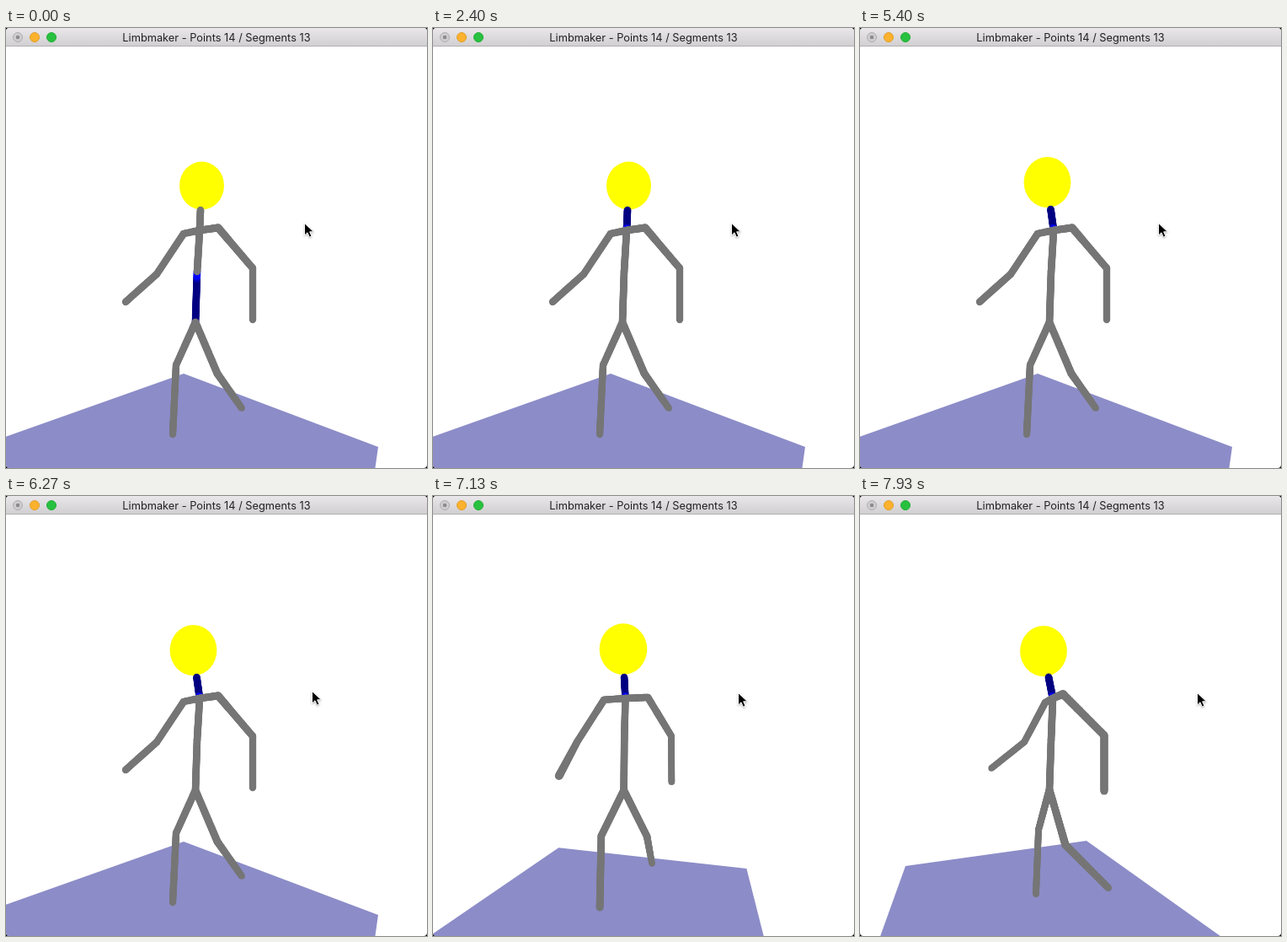
An HTML page with a canvas for the animation above (8 s loop, 500 by 522 pixels).

```html
<!DOCTYPE html>
<html lang="en">
<head>
<meta charset="utf-8">
<title>Stick figure editor</title>
<style>
  html, body { margin: 0; width: 100%; height: 100%; overflow: hidden; background: #000; }
  .window { position: relative; width: 500px; height: 522px; overflow: hidden; background: #fff; border-radius: 4px; }
  canvas { position: absolute; left: 0; top: 0; }
  .bar {
    position: absolute; left: 0; top: 0; width: 500px; height: 22px; box-sizing: border-box;
    background: linear-gradient(#e9e7e9, #d1cfd1); border-bottom: 1px solid #b3b1b3;
    font: 12.8px/23px Inter, Roboto, sans-serif; color: #222; text-align: center; white-space: nowrap;
  }
  .bar i { position: absolute; top: 5px; width: 12px; height: 12px; border-radius: 50%; box-sizing: border-box; }
  .close { left: 8px; background: radial-gradient(circle, #8d8b8d 0 2px, #cfcdcf 2.6px); border: 1px solid #aeacae; }
  .min { left: 28px; background: #fdb22e; border: 1px solid #e09e2a; }
  .max { left: 48px; background: #28c13f; border: 1px solid #22ab35; }
  .arrow { position: absolute; left: 0; top: 0; width: 16px; height: 22px; overflow: visible; filter: drop-shadow(0 1px 1px rgba(0,0,0,.3)); }
</style>
</head>
<body>
<div class="window">
  <canvas id="stage" width="500" height="522"></canvas>
  <div class="bar"><i class="close"></i><i class="min"></i><i class="max"></i>Limbmaker - Points 14 / Segments 13</div>
  <svg class="arrow" id="arrow"><path d="M.5 .5V15L4 11.8 6.4 17.2 9 16 6.7 10.8H11.4Z" fill="#000" stroke="#fff"/></svg>
</div>
<script>
const LOOP = 8000, RATE = 15;
const ctx = document.getElementById('stage').getContext('2d');
const arrow = document.getElementById('arrow');

// Screen positions seen from three orbit angles: front, rest, side.
const ANGLES = [0, 40, 67];
const JOINTS = {
  hip: [227, 349, 225, 349, 225, 348],
  belly: [227, 289, 227, 289, 227, 289],
  chest: [227, 240, 230, 240, 229, 240],
  neck: [227, 215, 226.5, 215, 224, 215],
  lShoulder: [200, 240, 211, 244, 220, 245],
  rShoulder: [254, 240, 252, 237, 241, 235],
  lElbow: [170, 291, 179, 292, 195, 292],
  rElbow: [273.5, 285, 293, 285, 290, 284],
  lHand: [160, 337, 142, 325, 156, 323],
  rHand: [273.5, 336, 293, 346, 290, 350],
  lKnee: [200, 405, 202, 400, 212, 396],
  rKnee: [252.5, 401, 251, 410, 244, 414],
  lFoot: [199.5, 491, 198, 482, 209, 472],
  rFoot: [247, 430, 280, 451, 295, 465]
};
const HEAD = [228, 180.5, 222.5, 183, 218, 184];
const FLOOR = [
  [25, 540, -40, 499, 54, 439],
  [117, 423, 211, 410, 269, 409],
  [323, 419, 442, 497, 470, 552],
  [508, 614, 330, 1290, -95, 853]
];
// parent, child
const BONES = [
  'belly hip', 'belly chest', 'chest neck',
  'chest lShoulder', 'lShoulder lElbow', 'lElbow lHand',
  'chest rShoulder', 'rShoulder rElbow', 'rElbow rHand',
  'hip lKnee', 'lKnee lFoot', 'hip rKnee', 'rKnee rFoot'
];

// Tables of [ms, value]
const HOVER = [
  [0, 'belly hip'], [133, ''], [200, 'belly chest'], [400, ''], [467, 'rShoulder rElbow'],
  [533, 'rElbow rHand'], [867, 'rShoulder rElbow'], [1133, 'chest rShoulder'], [1400, ''],
  [1533, 'lElbow lHand'], [1800, 'lShoulder lElbow'], [1933, ''], [2000, 'chest lShoulder'],
  [2267, ''], [2400, 'chest neck']
];
const BEND = [[3533, 0], [3600, .05], [3933, .05], [4000, .2], [4333, .2], [4733, .55], [4800, .55], [5067, 1]];
const ORBIT = [[6400, 40], [6733, 0], [6867, -4], [7000, 0], [7467, 45], [7933, 67]];
const TILT = [[7000, 0], [7467, 1], [7933, 0]];
const MOUSE_X = [[6200, 354], [6400, 381], [6733, 352], [6867, 349], [7000, 352], [7467, 388], [7933, 400]];
const MOUSE_Y = [[6200, 231], [6733, 232], [7467, 233]];

const mix = (a, b, k) => a + (b - a) * k;
const clamp = k => Math.min(1, Math.max(0, k));

function tween(keys, t) {
  const i = keys.findIndex(k => k[0] > t);
  if (i === 0) return keys[0][1];
  if (i < 0) return keys[keys.length - 1][1];
  const [t0, a] = keys[i - 1], [t1, b] = keys[i];
  return mix(a, b, (t - t0) / (t1 - t0));
}

// Quadratic through the three views; its x slope gives the depth, hence the scale.
function view(p, angle) {
  const [a, b, c] = ANGLES;
  const fit = i => {
    const s = (p[i + 2] - p[i]) / (b - a);
    const q = ((p[i + 4] - p[i + 2]) / (c - b) - s) / (c - a);
    return {
      value: p[i] + (angle - a) * (s + q * (angle - b)),
      slope: s + q * (2 * angle - a - b)
    };
  };
  const x = fit(0), y = fit(1);
  return { x: x.value, y: y.value, scale: 316 / (316 + 57.3 * x.slope) };
}

function bone(p, q, lit) {
  const n = Math.ceil(Math.hypot(q.x - p.x, q.y - p.y));
  ctx.fillStyle = '#767676';
  for (let i = n; i >= 0; i--) {
    const k = i / n;
    if (lit) ctx.fillStyle = `rgb(0,0,${mix(255, 130, clamp((k - .08) / .08))})`;
    ctx.beginPath();
    ctx.arc(mix(p.x, q.x, k), mix(p.y, q.y, k), 4.3 * mix(p.scale, q.scale, k), 0, 7);
    ctx.fill();
  }
}

function draw(t) {
  const angle = tween(ORBIT, t), bend = tween(BEND, t), tilt = tween(TILT, t);
  const lit = HOVER.filter(k => k[0] <= t + 1).pop()[1];

  ctx.clearRect(0, 0, 500, 522);
  ctx.save();
  // slight camera roll and pitch while dragging
  ctx.translate(227, 250);
  ctx.rotate(-.02 * tilt);
  ctx.scale(1, 1 - .012 * tilt);
  ctx.translate(-227, -250);

  ctx.fillStyle = '#8c8cc8';
  ctx.beginPath();
  for (const corner of FLOOR) {
    const { x, y } = view(corner, angle);
    ctx.lineTo(x, y);
  }
  ctx.fill();

  const pose = {};
  for (const name in JOINTS) pose[name] = view(JOINTS[name], angle);
  const head = view(HEAD, angle);
  const back = 1 - bend;
  pose.neck.x += 4.5 * back;
  pose.neck.y += back;
  head.x += 10 * back;
  head.y += 4 * back;
  const grow = mix(.6, 0, clamp(angle / 40));

  ctx.fillStyle = '#ff0';
  ctx.beginPath();
  ctx.ellipse(head.x, head.y, mix(26.5, 27.9, bend) + grow, mix(28.5, 30, bend) + grow, 0, 0, 7);
  ctx.fill();

  const order = BONES.slice().sort((a, b) => (b === lit) - (a === lit));
  for (const name of order) {
    const [p, q] = name.split(' ');
    bone(pose[p], pose[q], name === lit);
  }
  ctx.restore();

  arrow.style.transform = `translate(${Math.round(tween(MOUSE_X, t))}px, ${Math.round(tween(MOUSE_Y, t))}px)`;
}

const start = performance.now();
function tick() {
  const t = (performance.now() - start) % LOOP;
  draw(Math.floor((t + 4) * RATE / 1000) * 1000 / RATE);
  requestAnimationFrame(tick);
}
tick();
</script>
</body>
</html>
```
